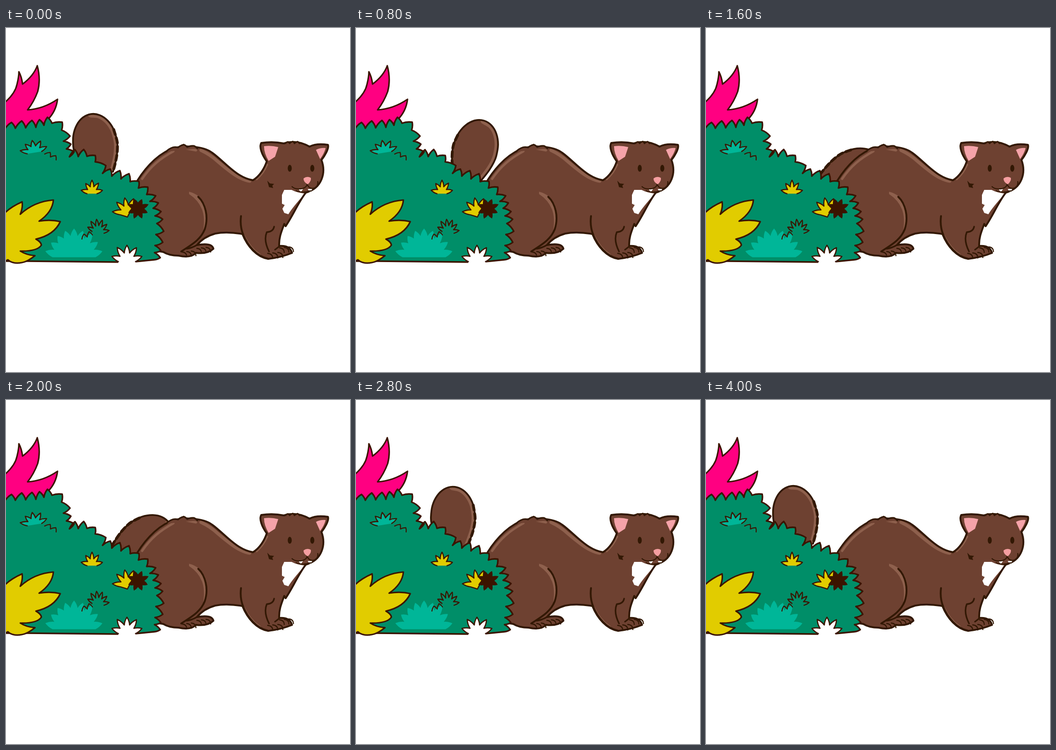
Animation of 748 by 748 pixels, one loop 5100 ms. Source, as an HTML page:

```html
<!DOCTYPE html>
<html lang="en">
<head>
<meta charset="utf-8">
<title>Marten behind a bush</title>
<style>
  html, body { margin: 0; width: 100%; height: 100%; overflow: hidden; background: #fff; }
  svg { display: block; width: 100vw; height: 100vh; }
  path { stroke-linejoin: round; stroke-linecap: round; }
</style>
</head>
<body>
<svg id="stage" viewBox="0 0 748 748">
  <defs><clipPath id="tailClip"><path id="tailMask"/></clipPath></defs>
</svg>
<script>
const INK = '#321804', LEAF_INK = '#3b1400', FUR = '#6e4131', SHINE = '#8e604d';
const GREEN = '#008e68', TEAL = '#00b698', YELLOW = '#e1cc00', PINK = '#ff0081';
const stage = document.getElementById('stage');

function add(d, fill, stroke, width) {
  const p = document.createElementNS('http://www.w3.org/2000/svg', 'path');
  p.setAttribute('d', d);
  p.setAttribute('fill', fill || 'none');
  if (stroke) {
    p.setAttribute('stroke', stroke);
    p.setAttribute('stroke-width', width);
  }
  stage.appendChild(p);
  return p;
}
const line = (d, width, color = INK) => add(d, '', color, width);

let seed = 7;
const rand = () => (seed = seed * 16807 % 2147483647) / 2147483647;

// Joins points with outward bulging curves, giving pointed leaves.
function leaves(pts, bulge = 0.13) {
  return pts.slice(1).reduce((d, [x, y], i) => {
    const [x0, y0] = pts[i];
    const cx = (x0 + x) / 2 + (y - y0) * bulge, cy = (y0 + y) / 2 - (x - x0) * bulge;
    return d + `Q${cx.toFixed(1)} ${cy.toFixed(1)} ${x.toFixed(1)} ${y.toFixed(1)}`;
  }, 'M' + pts[0]);
}

// A row of pointed tufts on the left-hand side of a polyline.
function tufts(text, pitch, height) {
  const nodes = text.split(' ').map(p => p.split(',').map(Number));
  const pts = [nodes[0]];
  for (let i = 1; i < nodes.length; i++) {
    const [x, y] = nodes[i - 1], dx = nodes[i][0] - x, dy = nodes[i][1] - y;
    const len = Math.hypot(dx, dy), n = Math.max(1, Math.round(len / pitch));
    for (let k = 0; k < n; k++) {
      const h = height * (0.8 + 0.4 * rand()) / len, s = (k + 0.65) / n, v = (k + 1) / n;
      pts.push([x + dx * s + dy * h, y + dy * s - dx * h], [x + dx * v, y + dy * v]);
    }
  }
  return leaves(pts);
}

// A fan of n leaves between two angles in degrees, clockwise.
function fan(cx, cy, rx, ry, n, inner, from = 180, to = 360) {
  const pts = [];
  for (let i = 0; i <= 2 * n; i++) {
    const a = (from + (to - from) * i / (2 * n)) * Math.PI / 180;
    const r = i % 2 ? 0.95 + 0.15 * rand() : inner;
    pts.push([cx + rx * r * Math.cos(a), cy + ry * r * Math.sin(a)]);
  }
  return leaves(pts);
}

// Smooth open curve through points.
function spline(pts) {
  const at = i => pts[Math.max(0, Math.min(pts.length - 1, i))];
  let d = 'M' + at(0);
  for (let i = 0; i < pts.length - 1; i++) {
    const [p, q, r, s] = [at(i - 1), at(i), at(i + 1), at(i + 2)];
    d += `C${[0, 1].map(k => q[k] + (r[k] - p[k]) / 6)} ${[0, 1].map(k => r[k] - (s[k] - q[k]) / 6)} ${r}`;
  }
  return d;
}

// ---- tail layers ----
const mask = document.getElementById('tailMask');
const tailFill = add('', FUR);
const tailShine = line('', 15, SHINE);
tailShine.setAttribute('clip-path', 'url(#tailClip)');
const tailLine = line('', 3.8);
const tailFur = line('', 6);
tailFur.setAttribute('stroke-dasharray', '11 8');

// ---- body ----
const body = 'M278 345C297 310 325 278 357 264C385 253 430 257 448 271C475 290 500 325 537 331' +
  'C552 322 562 305 567 290C556 275 550 258 555 250Q580 246 604 251Q632 242 660 258Q675 250 700 254' +
  'C703 262 693 278 686 287C696 314 688 348 652 358C636 378 624 408 608 431L605 426C600 440 593 455 594 474' +
  'Q617 472 622 489Q598 499 570 502C545 498 525 475 514 448Q480 442 455 447Q430 454 415 472' +
  'Q448 466 451 480Q438 492 413 489Q402 501 375 495Q355 495 342 487L300 480Z';
add(body, FUR);
line('M296 328C315 300 335 284 364 268M392 262L413 266', 5, SHINE);
line('M424 266Q444 275 460 290C482 308 505 329 530 333', 7, SHINE);
line('M545 329Q560 316 568 297M518 452Q530 478 552 493', 4, SHINE);
add('M398 356Q424 362 434 388Q442 416 429 440Q433 411 426 394Q418 374 398 361Z', SHINE);
add('M605 352L600 363L600 382L606 385L601 393L605 402L614 405Q622 391 650 360Q632 358 621 352Z', '#fff');
line(body, 4);
add(tufts('348,269 374,260 394,259 416,262', 20, 5), FUR, INK, 3.4);
add(tufts('606,251 638,251', 11, 4), FUR, INK, 3);

// ---- legs and paws ----
line('M418 367C434 382 441 411 432 438C423 461 402 472 381 486M511 409C509 425 511 438 516 450C526 474 545 496 568 501', 4);
line('M583 432Q581 443 567 444C561 458 566 474 572 486M415 472Q405 478 393 480M594 475L585 482', 3.4);
function toes(x, y, size) {
  let d = '';
  for (let i = 0; i < 3; i++) d += `M${x + i * size} ${y - i}q${size} 1 ${size} ${size}`;
  line(d, 2.5);
}
toes(383, 487, 10);
toes(415, 479, 10);
toes(569, 490, 11);
toes(595, 478, 10);
add('M568 332L574 338L583 339L579 343L581 348L572 346Z', INK);

// ---- face ----
const EAR = '#f5a3a9';
add('M561 257Q577 255 592 259L585 280L571 289Q561 272 561 257Z', EAR);
add('M674 265Q684 260 695 261Q692 273 683 285Z', EAR);
for (const x of [617, 666]) add(`M${x - 4.4} 305a4.4 7.5 0 1 0 8.8 0a4.4 7.5 0 1 0 -8.8 0`, INK);
for (const x of [636, 656]) add(`M${x} 350l5 7l5 -7z`, '#fff');
line('M622 345Q629 352 645 349Q655 346 655 338Q656 348 667 349Q679 347 678 334M631 354Q645 360 662 354', 2.4);
add('M647 327Q655 321 663 326Q664 333 656 340Q646 334 647 327Z', '#f59ea0');

// ---- bush and plants ----
add('M-5 164Q20 143 24 122Q28 106 28 95Q34 106 36 122Q60 104 68 82Q76 112 69 138Q61 160 47 178' +
  'Q81 176 112 155Q109 181 91 199L64 225L-5 225Z', PINK, LEAF_INK, 3.2);
const edge = tufts('-2,219 65,216 100,207 121,222 125,246 138,280 176,279 194,291 210,316 270,334 306,362 320,392 328,425 324,473 322,504', 20, 14);
add(edge + 'L282 508L247 509L45 507L-6 507Z', GREEN, LEAF_INK, 3.4);
add(fan(148, 503, 60, 66, 9, 0.78, 185, 355), TEAL);
add(fan(62, 271, 29, 27, 5, 0.55, 170, 350), TEAL, LEAF_INK, 2.4);
line(tufts('84,274 109,287', 12, 9), 2.2, LEAF_INK);
add(fan(187, 358, 22, 27, 5, 0.5, 170, 370), YELLOW, LEAF_INK, 2.4);
add(fan(264, 402, 30, 34, 4, 0.5, 165, 315) + 'L264 411Z', YELLOW, LEAF_INK, 2.4);
add(fan(287, 393, 23, 23, 8, 0.6, 0, 360), LEAF_INK);
line(fan(200, 445, 24, 28, 6, 0.55, 190, 365), 2.3, LEAF_INK);
line(tufts('165,459 188,450', 12, 8), 2.2, LEAF_INK);
const sprig = fan(263, 508, 34, 36, 5, 0.55, 180, 360);
add(sprig + 'v6h-38z', '#fff');
line(sprig, 2.6, LEAF_INK);
add('M-5 405Q8 390 35 378Q37 390 31 405Q62 377 103 374Q101 400 72 420Q97 416 118 421Q105 450 65 459' +
  'Q76 465 77 472Q68 486 31 485Q45 494 63 495Q47 508 35 510Q15 514 4 504L-5 509Z', YELLOW, LEAF_INK, 3.2);

// ---- tail motion: time, lean in degrees, root x ----
const keys = [
  [0, -8, 203], [200, -8, 206], [600, 6, 224], [800, 17, 240], [1200, 62, 262], [1800, 62, 262],
  [2000, 55, 247], [2400, 18, 223], [3000, -7, 208], [4000, -8, 203], [5100, -8, 203]
];
const LOOP = 5100, STEP = 100, LENGTH = 131, HALF = 48, ROOT = 30;

function leanAt(t) {
  const i = keys.findIndex(k => k[0] > t);
  const [t0, a0, x0] = keys[i - 1], [t1, a1, x1] = keys[i];
  const k = (1 - Math.cos(Math.PI * (t - t0) / (t1 - t0))) / 2;
  return [a0 + (a1 - a0) * k, x0 + (x1 - x0) * k];
}

// Club-shaped outline: a tapering stem below, half an ellipse on top.
function tailShape(lean, rootX) {
  const a = lean * Math.PI / 180, rootY = 320 + lean * 0.4;
  const place = (side, up) => [
    rootX + side * Math.cos(a) + up * Math.sin(a),
    rootY + side * Math.sin(a) - up * Math.cos(a)
  ];
  const pts = [], mid = LENGTH / 2;
  const stem = (side, s) => place(side * (ROOT + (HALF - ROOT) * Math.sin(s * Math.PI / 2)), s * mid);
  for (let s = 0; s < 1; s += 0.25) pts.push(stem(-1, s));
  for (let i = 0; i <= 8; i++) {
    const b = i * Math.PI / 8;
    pts.push(place(-HALF * Math.cos(b), mid + mid * Math.sin(b)));
  }
  for (let s = 0.75; s >= 0; s -= 0.25) pts.push(stem(1, s));
  return pts;
}

let shown = -1;
function draw(now) {
  const t = Math.floor((now % LOOP) / STEP) * STEP;
  if (t === shown) return;
  shown = t;
  const [lean, x] = leanAt(t);
  const pts = tailShape(lean, x), outline = spline(pts);
  for (const p of [mask, tailFill]) p.setAttribute('d', outline + 'Z');
  tailLine.setAttribute('d', outline);
  tailShine.setAttribute('d', spline(pts.slice(8)));
  tailFur.setAttribute('d', spline(lean < 0 ? pts.slice(11) : pts.slice(0, 6)));
}

const start = performance.now();
function tick() {
  draw(performance.now() - start);
  requestAnimationFrame(tick);
}
tick();
</script>
</body>
</html>
```
